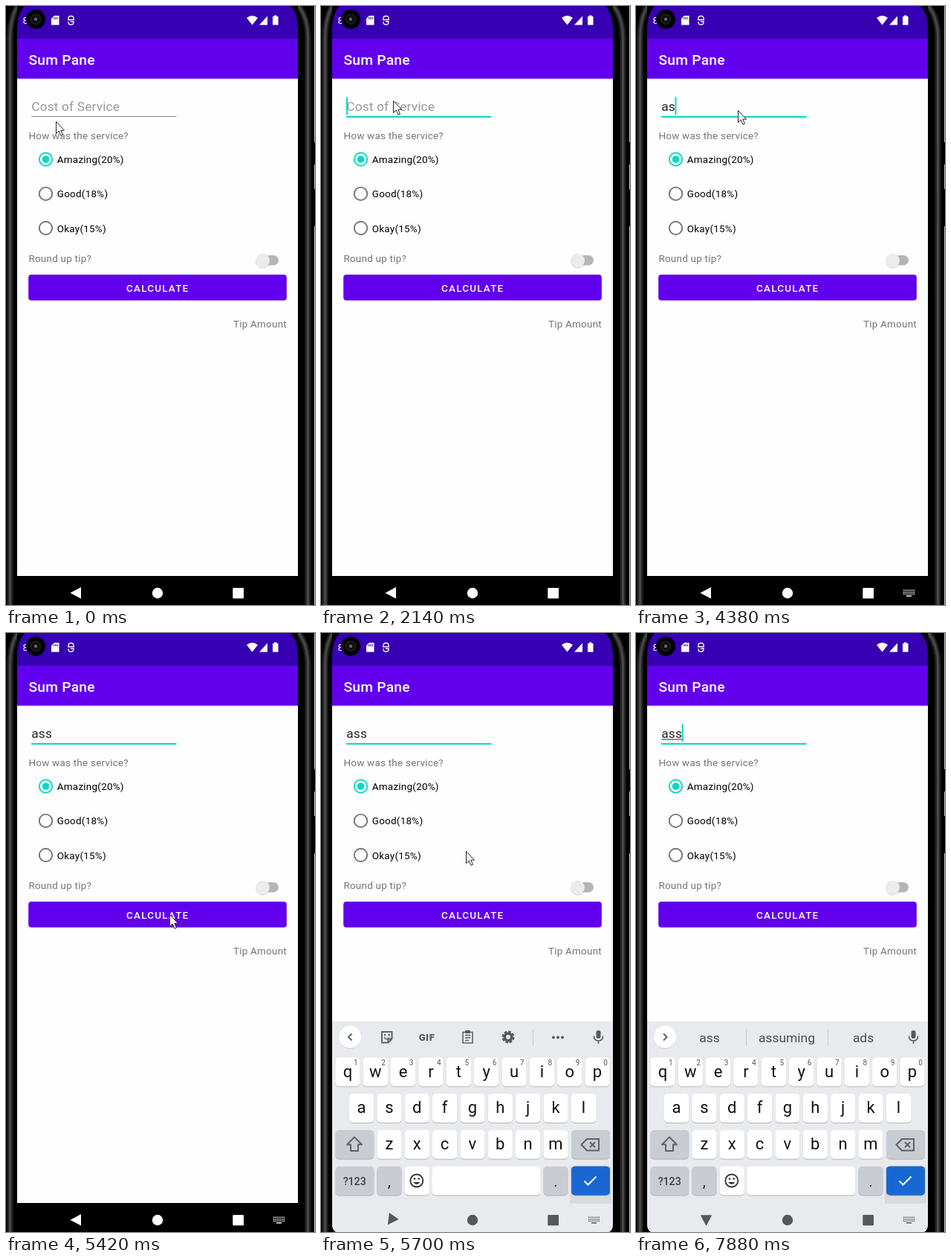
Animation of 416x805 px, one loop 8 s. Source, as an HTML page:

```html
<!DOCTYPE html>
<html lang="en">
<head>
<meta charset="utf-8">
<title>Sum Pane</title>
<style>
html, body { margin: 0; width: 100%; height: 100%; overflow: hidden; background: #000; }
svg { display: block; width: 416px; height: 805px; font-family: Roboto, sans-serif; }
.body { font-size: 13.46px; letter-spacing: .0178em; }
.field { font-size: 17.3px; letter-spacing: .0094em; }
.line { fill: none; stroke: #5f6368; stroke-width: 2; }
.mid { text-anchor: middle; }
</style>
</head>
<body>
<svg id="stage" viewBox="0 0 416 805"></svg>
<script>
const LOOP = 8000, TEAL = '#03dac5', GREY = '#757575', ICON = '#55585c';

const rect = (x, y, w, h, fill, r = 0) =>
  `<rect x="${x}" y="${y}" width="${w}" height="${h}" rx="${r}" fill="${fill}"/>`;
const circle = (x, y, r, attrs) => `<circle cx="${x}" cy="${y}" r="${r}" ${attrs}/>`;
const path = (d, attrs) => `<path d="${d}" ${attrs}/>`;
const text = (x, y, s, attrs) => `<text x="${x}" y="${y}" ${attrs}>${s}</text>`;
const group = (id, content, attrs = '') => `<g id="${id}" ${attrs}>${content}</g>`;

function bezel() {
  const layers = [[9, '#151515'], [6, '#2a2a2a'], [3, '#424242'], [1.2, '#4c4c4c']];
  const edge = d => layers.map(([w, c]) =>
    path(d, `fill="none" stroke="${c}" stroke-width="${w}"`)).join('');
  const outer = [[0, 183], [213, 33], [296, 509]];
  return rect(0, 0, 416, 805, '#000') +
    edge('M17 -2Q5.500 14 5.500 44V805') + edge('M392 -2Q406.500 14 406.500 44V805') +
    outer.map(([y, h]) => rect(415, y, 1, h, '#c4c4c4')).join('');
}

function statusBar() {
  return rect(15, 0, 378, 44, '#3700b3') +
    path('M15 0H25Q16 9 15 28zM393 0H383Q392 9 393 28z', 'fill="#000"') +
    text(22.5, 24, '8', 'fill="#fff" font-size="13.5"') +
    circle(40, 17.7, 13, 'fill="#000"') +
    circle(40, 17.7, 6.500, 'fill="#0e0e0e" stroke="#222" stroke-width="1.5"') +
    circle(40, 17.7, 2.2, 'fill="#666"') +
    path('M65 13h6.5v12.5h-10.5v-8.5z', 'fill="#fff"') +
    path('M64.7 15v3m2.2-3v3m2.2-3v3', 'stroke="#3700b3"') +
    path('M84 18v-1.500q0-3 3.500-3t3.500 3V18M83 18.500h9M84 21v1q0 3 3.500 3t3.500-3v-1h-4',
      'fill="none" stroke="#fff" stroke-width="1.3"') +
    path('M331.500 25.500l-7.500-9.500q7.500-6 15 0zM341 25.500h11v-12z', 'fill="#fff"') +
    path('M359 14h2v-1.500h3.500v1.500h2v11.500h-7.500z', 'fill="#fff"');
}

function radio(y, label, on) {
  const c = on ? TEAL : GREY;
  return circle(53.5, y, 8.7, `fill="none" stroke="${c}" stroke-width="1.9"`) +
    (on ? circle(53.5, y, 4.8, `fill="${c}"`) : '') +
    text(68.8, y + 5, label, 'class="body" fill="#000"');
}

function app() {
  return rect(15, 44, 378, 722, '#fefefe') +
    rect(15, 97, 378, 1.5, '#e2dfe8') + rect(15, 44, 378, 53.6, '#6200ee') +
    text(30.4, 78.5, 'Sum Pane', 'font-size="19.24" font-weight="500" letter-spacing=".24" fill="#fff"') +
    text(34.3, 141, '', 'id="entry" class="field"') +
    group('spell', rect(34.5, 142.5, 28, 1, '#222')) +
    group('idleLine', rect(34, 148, 195.5, 1, '#888')) +
    group('focusLine', rect(34, 148, 195.5, 2, TEAL)) +
    group('caret', rect(-1, 122.5, 2, 23.5, TEAL)) +
    text(30.4, 179, 'How was the service?', `class="body" fill="${GREY}"`) +
    radio(206, 'Amazing(20%)', true) + radio(252.3, 'Good(18%)') + radio(298.5, 'Okay(15%)') +
    text(30.4, 344, 'Round up tip?', `class="body" fill="${GREY}"`) +
    rect(338, 335, 29, 13.5, '#b5b5b5', 6.75) +
    circle(345.6, 343, 9.7, 'fill="#000" opacity=".14"') +
    circle(345.6, 342, 9.5, 'fill="#ececec"') +
    rect(30, 361.5, 348.3, 35.3, '#dcd9e2', 4) + rect(30.2, 361, 347.6, 34.6, '#6200ee', 4) +
    text(162, 383.6, 'CALCULATE', 'font-size="13.46" font-weight="500" letter-spacing="1.2" fill="#fff"') +
    text(378, 431.7, 'Tip Amount', `class="body" text-anchor="end" fill="${GREY}"`);
}

const key = (x, y, w, fill = '#fff') =>
  rect(x, y + 1, w, 38.7, '#b4b6ba', 5) + rect(x, y, w, 38.7, fill, 5);

function keyRow(letters, x0, y, digits) {
  return [...letters].map((c, i) => {
    const x = x0 + i * 37.35;
    return key(x, y, 33.2) + text(x + 16.6, y + 26, c, 'class="mid" font-size="22" fill="#111"') +
      (digits ? text(x + 27.5, y + 10.5, (i + 1) % 10, 'class="mid" font-size="10" fill="#555"') : '');
  }).join('');
}

const gear = x =>
  circle(x, 543, 7, `fill="none" stroke="${ICON}" stroke-width="3" stroke-dasharray="3.6 1.9"`) +
  circle(x, 543, 4.7, `fill="none" stroke="${ICON}" stroke-width="3.6"`);

const palette =
  path('M252 535c-11 0-11 16 0 16 3 0 1-3 2-4 1-2 6 1 6-4.500 0-5-4-7.500-8-7.500z', `fill="${ICON}"`) +
  [[247.3, 543], [249.7, 539], [254.3, 539], [257, 543]].map(p => circle(...p, 1.4, 'fill="#e8eaed"')).join('');

const clipboard =
  path('M191 536.500h13v14.500h-13zM194 540.500h7m-7 3.500h7m-7 3.500h5', 'class="line" style="stroke-width:1.6"') +
  rect(194, 534, 7, 4, ICON, 1);

function toolStrip() {
  return path('M41.500 538.500l-4.500 4.500 4.500 4.500', 'class="line"') +
    path('M83 536h12.500v9.500l-5 5H82V536zM95.500 545.500h-5v5', 'class="line" stroke-linejoin="round"') +
    path('M85 543.500q3.500 4.500 7 0', 'class="line" style="stroke-width:1.5"') +
    circle(86, 540, 1.2, `fill="${ICON}"`) + circle(91.5, 540, 1.2, `fill="${ICON}"`) +
    text(142.5, 547.5, 'GIF', `class="mid" font-size="13" font-weight="900" letter-spacing=".6" fill="${ICON}"`) +
    group('toolsA', gear(197.5) + palette) + group('toolsB', clipboard + gear(252)) +
    rect(285, 533, 1, 21, '#c5c7ca') +
    [313, 319, 325].map(x => circle(x, 543.5, 1.9, `fill="${ICON}"`)).join('');
}

function suggestions() {
  const words = [[99, 'ass'], [203, 'assuming'], [306, 'ads']];
  return path('M37 538.500l4.500 4.500-4.500 4.500', 'class="line"') +
    words.map(([x, w]) => text(x, 550, w, 'class="mid" font-size="17.4" fill="#4a4d51"')).join('') +
    rect(148, 532, 1, 23, '#c5c7ca') + rect(258, 532, 1, 23, '#c5c7ca');
}

function keyboard() {
  const dark = '#c9ccd3';
  return rect(15, 522, 378, 300, '#e8eaed') +
    circle(39, 544, 15, 'fill="#ced0d3"') + circle(39, 543, 15, 'fill="#fff"') +
    group('tools', toolStrip()) + group('words', suggestions()) +
    rect(370.5, 534, 6, 11, ICON, 3) +
    path('M367.500 541.500q0 6.500 6 6.500t6-6.500M373.500 548v4', 'class="line" style="stroke-width:1.7"') +
    keyRow('qwertyuiop', 19.3, 570.5, true) + keyRow('asdfghjkl', 38, 619.2) +
    keyRow('zxcvbnm', 75.3, 668) +
    key(19.3, 668, 52, dark) + key(337, 668, 52, dark) +
    path('M45 677.500l-10 10h5v8.500h10v-8.500h5z', 'class="line" stroke-linejoin="round"') +
    path('M358 680h16v15.500h-16l-7.500-7.750zM362 684.300l7 7m0-7l-7 7', 'class="line"') +
    key(19.3, 716.7, 52, dark) + key(75.3, 716.7, 33.2, dark) + key(112.6, 716.7, 33.2) +
    key(149.2, 716.7, 146.2) + key(299.4, 716.7, 33.2, dark) +
    text(45.2, 741.5, '?123', 'class="mid" font-size="14.2" font-weight="500" fill="#3c4043"') +
    text(91.8, 744, ',', 'class="mid" font-size="21" fill="#222"') +
    text(316, 744, '.', 'class="mid" font-size="21" fill="#222"') +
    circle(128.8, 736, 8.5, 'class="line" style="stroke:#333;stroke-width:1.8"') +
    path('M124 738q4.800 6 9.600 0z', 'fill="#333"') +
    circle(126, 733.5, 1.3, 'fill="#333"') + circle(131.6, 733.5, 1.3, 'fill="#333"') +
    group('press', rect(335, 716.7, 56, 50, '#d8dade')) +
    key(337, 716.7, 52, '#1a73e8') + group('pressKey', rect(337, 716.7, 52, 38.7, '#1967d2', 5)) +
    path('M354.500 736.500l5 5 11-11', 'class="line" style="stroke:#fff"');
}

function navBar() {
  let dots = '';
  for (let i = 0; i < 6; i++)
    for (let j = 0; j < 3; j++) dots += rect(360 + i * 2.7, 784.5 + j * 2.5, 1.5, 1.5, 'currentColor');
  return path('M-8 0L6.500-7.800V7.800z', 'id="back" fill="currentColor"') +
    circle(204, 789, 7.2, 'fill="currentColor"') + rect(305.3, 782, 14.7, 14.2, 'currentColor', 1) +
    group('kbIcon', dots + rect(364, 792, 7, 1.5, 'currentColor'));
}

document.getElementById('stage').innerHTML =
  bezel() + statusBar() + app() + group('keyboard', keyboard()) + group('nav', navBar()) +
  path('M15 797Q16 803 20 805H15zM393 797Q392 803 388 805H393z', 'fill="#000"') +
  path('M.5.5V16.5L4.2 13 7 19.3 9.5 18.2 6.8 12.2H11.5z', 'id="pointer" fill="#fff" stroke="#222"');

// [time, value...] lists; each entry holds until the next
const pointerSteps = [
  [0, 67, 155], [120, 104, 71], [400, 104, 83], [520, 102, 100], [640, 99, 117], [760, 97, 127],
  [3180, 108, 205], [3300, 118, 287], [3450, 105, 227], [3600, 112, 180], [3720, 122, 140],
  [3870, 137, 140], [4900, 170, 220], [5030, 222, 365], [5300, 222, 372], [5420, 220, 378],
  [5570, 215, 373], [5700, 195, 293], [5840, 198, 350], [5960, 201, 400], [6090, 202, 426],
  [6240, 202, 421], [6390, 202, 413], [6540, 205, 406], [6660, 208, 401], [7200, 214, 430],
  [7330, 219, 456], [7480, 235, 590], [7610, 250, 698], [7880, -50, 0]];
const entrySteps = [[0, 0], [4140, 1], [4380, 2], [4900, 3]];
const backSteps = [[0, 0], [5570, -8], [5700, -55], [5840, -90]];
const caretFlips = [1070, 1740, 2140, 2640, 3180, 3720, 4020, 5300, 5840, 6390, 6780, 7330, 7880];

const $ = id => document.getElementById(id);
const at = (steps, t) => steps.findLast(s => s[0] <= t).slice(1);
const show = (id, on) => $(id).setAttribute('display', on ? 'inline' : 'none');
const move = (id, x, y, turn = 0) => $(id).setAttribute('transform', `translate(${x} ${y}) rotate(${turn})`);

function draw(t) {
  const [typed] = at(entrySteps, t), open = t >= 5570, settled = t >= 5700;
  $('entry').textContent = typed ? 'ass'.slice(0, typed) : 'Cost of Service';
  $('entry').setAttribute('fill', typed ? '#212121' : '#999');
  show('idleLine', t < 1070);
  show('focusLine', t >= 1070);
  show('spell', t >= 5840);
  show('caret', caretFlips.filter(f => f <= t).length % 2);
  move('caret', 35 + typed * 9.2, 0);

  show('keyboard', open);
  move('keyboard', 0, settled ? 0 : 19);
  show('toolsA', !settled);
  show('toolsB', settled);
  show('tools', t < 6900);
  show('words', t >= 6900);
  show('press', settled);
  show('pressKey', settled);

  $('nav').setAttribute('color', open ? ICON : '#fff');
  show('kbIcon', t >= 4020);
  move('back', 94.5, 788.8, ...at(backSteps, t));
  move('pointer', ...at(pointerSteps, t));
}

const start = performance.now();
function tick() {
  draw((performance.now() - start) % LOOP);
  requestAnimationFrame(tick);
}
tick();
</script>
</body>
</html>
```
